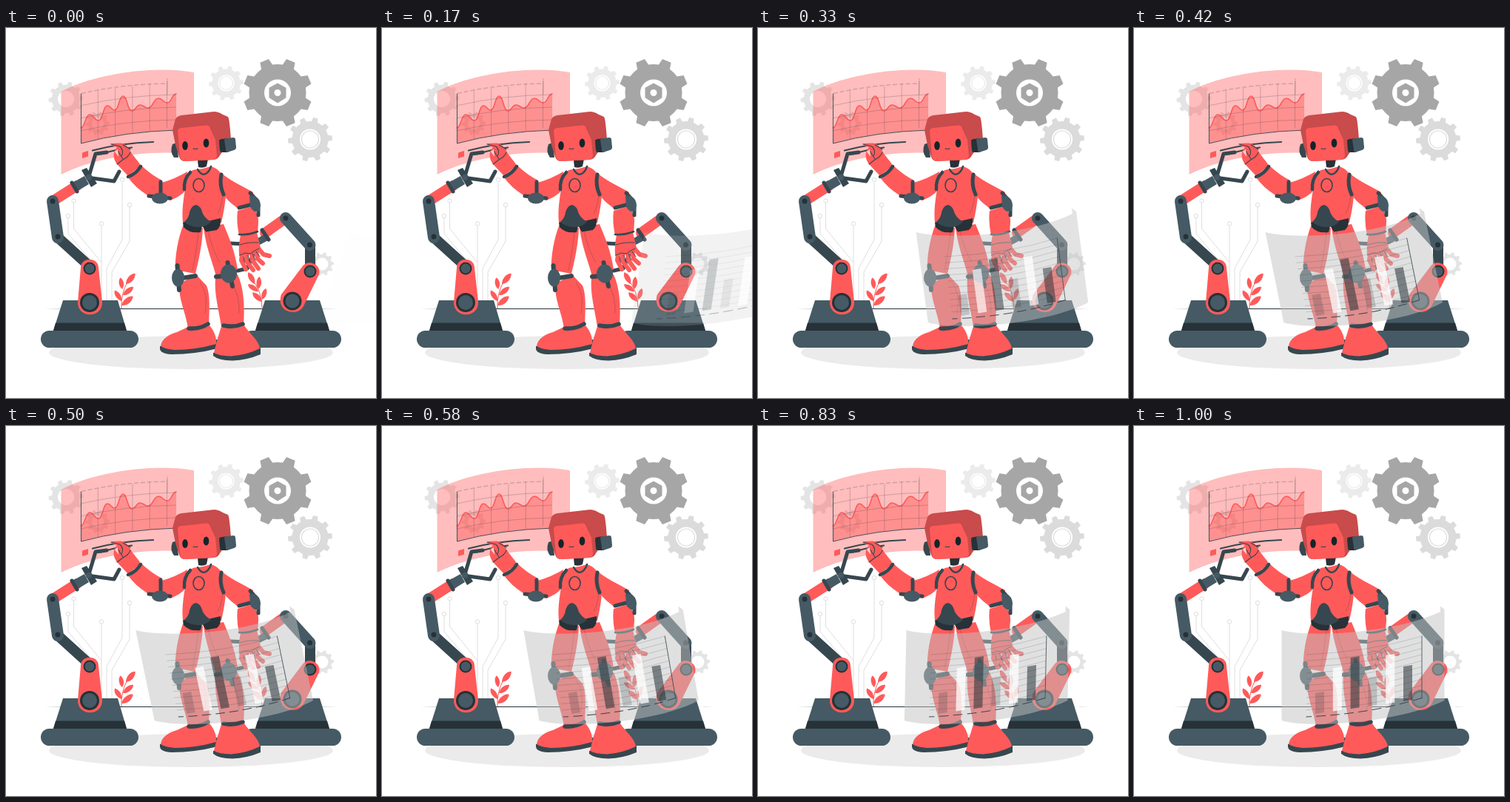
Recreate the animation shown at these times as an HTML page. Size 500x500 px, loop 1.04 s.

```html
<!DOCTYPE html>
<html lang="en">
<head>
<meta charset="utf-8">
<title>Robot and panels</title>
<style>
  html, body { margin: 0; width: 100%; height: 100%; overflow: hidden; background: #fff; }
  svg { display: block; width: 100%; height: 100%; }
  .red { fill: #ff5a5a; }
  .dark { fill: #37474f; }
  .slate { fill: #455a64; }
  .night { fill: #263238; }
  .line { fill: none; stroke: #37474f; stroke-linecap: round; stroke-linejoin: round; }
  .thin { fill: none; stroke: #263238; stroke-width: .5; }
  .limb { fill: none; stroke-linecap: round; stroke-linejoin: round; }
</style>
</head>
<body>
<svg viewBox="0 0 500 500">
  <g id="gears"></g>

  <!-- circuit traces -->
  <g fill="none" stroke="#dedede">
    <path d="M91.500 236V271L129 317M84 257V278L122 323V379M129 267V379M167 242V288L143 330V379M157 208V286L136 325V379"/>
    <g fill="#fff">
      <circle cx="91.500" cy="233.500" r="2.700"/><circle cx="84" cy="254" r="2.700"/>
      <circle cx="129" cy="264.500" r="2.700"/><circle cx="167" cy="239" r="2.700"/>
      <circle cx="157" cy="205" r="2.700"/>
    </g>
  </g>

  <ellipse cx="250" cy="438.500" rx="192" ry="22.500" fill="#ebebeb"/>
  <path class="night" d="M52 379.500L150 379H350L448 379.500L350 380H150Z"/>
  <g id="plants" class="red"></g>

  <!-- red chart panel -->
  <path d="M74.500 86C118 62 200 50 254 60V171C200 163 120 174 74.500 198Z" fill="#ff5a5a" opacity=".4"/>
  <path id="area" fill="#ff5a5a" opacity=".45"/>
  <path id="curve" class="limb" stroke="#ff5a5a" stroke-width="1.600"/>
  <path id="redGrid" class="thin" opacity=".45"/>
  <path class="line" stroke-width=".9" d="M101.500 89V156Q160 140 230 138"/>
  <path class="thin" opacity=".6" stroke-dasharray="6 3" d="M102 88.500Q155 76 218 75"/>
  <path class="red" d="M103 168.500L111 166V173.500L103 176Z"/>
  <path class="line" stroke-width="2.200" d="M117 165.500Q155 155.500 199 154M128 170.500Q148 164 170 161.500"/>

  <!-- left machine -->
  <rect class="slate" x="47" y="409" width="132" height="23" rx="11.500"/>
  <path class="slate" d="M77 368H151L163 409H64Z"/>
  <path class="night" d="M67 398.500H160L163 409H64Z"/>
  <g class="limb" stroke-width="14">
    <path stroke="#ff5a5a" d="M63 234L96 213"/>
    <path stroke="#37474f" d="M70 283L113 322"/>
    <path stroke="#455a64" stroke-width="16" d="M63 234L70 283"/>
  </g>
  <circle class="night" cx="63" cy="234" r="3.500"/><circle class="night" cx="70" cy="282" r="3.500"/>
  <path class="red" d="M101 324C101 309 125 309 125 324L130 370C131 393 96 393 97 370Z"/>
  <g class="night">
    <circle cx="113" cy="325" r="8.500"/><circle cx="113" cy="371" r="13"/>
  </g>
  <circle class="slate" cx="113" cy="325" r="6.500"/><circle class="slate" cx="113" cy="371" r="10"/>
  <path class="slate" d="M90 209L106 200L112 211L97 220Z"/>
  <path class="line" stroke-width="5" d="M89 209L96 221"/>
  <path class="dark" d="M102 192L109 189L123 210L115 215Z"/>
  <path class="line" stroke-width="5" d="M113 197L121 170L136 168M117 203L146 207L153 194"/>
  <circle class="slate" cx="112" cy="202" r="4"/>

  <!-- right machine -->
  <rect class="slate" x="321" y="409" width="132" height="23" rx="11.500"/>
  <path class="slate" d="M350 368H424L437 409H337Z"/>
  <path class="night" d="M340 398.500H434L437 409H337Z"/>
  <g class="limb" stroke-width="14">
    <path stroke="#ff5a5a" d="M378 257L350 277"/>
    <path stroke="#37474f" d="M411 293V328"/>
    <path stroke="#455a64" stroke-width="16" d="M378 257L410.500 293"/>
  </g>
  <circle class="night" cx="378" cy="257" r="3.500"/><circle class="night" cx="410.500" cy="293" r="3.500"/>
  <path class="red" d="M400 323C407 311 427 319 423 333L402 376C394 391 364 384 372 360Z"/>
  <g class="night">
    <circle cx="411" cy="329" r="8.500"/><circle cx="387" cy="369" r="12.500"/>
  </g>
  <circle class="slate" cx="411" cy="329" r="6.500"/><circle class="slate" cx="387" cy="369" r="9.500"/>
  <path class="slate" d="M352 277L337 286L341 294L356 286Z"/>
  <path class="line" stroke-width="5" d="M346 273L355 286M338 290L325 292L303 291M338 296L326 325L313 328"/>

  <!-- legs -->
  <path class="red" d="M240 265C232 285 228 310 229 327L256 332C260 315 265 295 266 270Z"/>
  <path class="red" d="M234 346C233 366 243 385 246 406L274 401C275 380 276 360 271 348Q263 340 257 333Z"/>
  <path class="red" d="M267 270C271 300 280 318 284 336L313 326C309 300 302 285 294 265Z"/>
  <path class="red" d="M283 338C281 360 288 382 291 404L321 401C323 375 321 350 313 333Z"/>
  <path class="thin" opacity=".5" d="M260 275Q257 305 252 327M262 344Q274 358 269 386M273 275Q279 300 289 317M306 347Q316 362 315 385"/>
  <path class="dark" d="M208 430L286 421L286 433Q255 441 224 441Q208 440 208 433Z"/>
  <path class="red" d="M209 430C210 420 220 414 231 411L246 404Q260 410 275 402C281 409 285 418 284 427Q256 435 228 435Q215 434 209 430Z"/>
  <path class="dark" d="M280 439L344 432L344 441Q325 449 306 449.500Q287 449 280 443Z"/>
  <path class="red" d="M281 439C284 425 288 413 291 403Q306 408 322 402C328 412 342 422 343 433Q325 442 304 443.500Q288 443 281 439Z"/>
  <path class="line" stroke-width="5.500" d="M247 406Q262 407 273 400M294 402Q308 405 320 400"/>
  <path class="line" stroke-width="6" d="M231.500 321L234 354M238 338L256 335M299.500 317L306 349M284 336L296 335"/>
  <ellipse class="slate" cx="232.500" cy="337.500" rx="8.500" ry="12"/>
  <ellipse class="slate" cx="301" cy="332" rx="11" ry="12.500"/>

  <!-- torso -->
  <path class="red" d="M259 191C249 191 246 197 244 206C241 225 237 243 239 263H291C295 245 299 225 296 208Q291 191 277 187Q268 190 259 191Z"/>
  <path class="night" d="M259 179L273 177L271 187Q266 190 260 188Z"/>
  <path class="night" d="M239 263L250 259L269 262L290 257Q291 268 285 273L270 275.500L265 267L263 276Q248 278 240 269Z"/>
  <path class="dark" d="M241 262Q247 257 248 249Q251 239 257 239Q263 240 266 251Q269 257 277 262Q269 270 258 269Q247 268 241 262Z"/>
  <path class="line" stroke-width="2.500" d="M259 191Q264 200 270 197Q275 194 277 187"/>
  <ellipse class="line" stroke-width="1.600" cx="260.500" cy="212.500" rx="7.500" ry="9"/>
  <path class="thin" opacity=".5" d="M293 226Q291 242 286 251"/>

  <!-- raised arm -->
  <path class="red" d="M245 194C235 200 222 206 210 209L207 228L222 233C232 229 239 224 243 219Z"/>
  <path class="red" d="M183 186Q197 199 211 206L208 227L191 226Q174 215 165 202Z"/>
  <path class="red" d="M165 200L182 186C178 178 170 172 167 164Q163 157 155 155.500L143 156Q139 158 150 161C144 168 144 176 150 184Z"/>
  <path class="line" stroke-width="1.100" d="M142 157L154 160Q160 166 156 173M151 166L158 177M158 158L168 164M150 184L158 178Q166 174 168 168"/>
  <path d="M151 164L147 167L152 174Z" fill="#ffd0d0"/>
  <path class="line" stroke-width="4.500" d="M165 201Q176 197 182 187M249 195Q240 204 241 218"/>
  <path class="line" stroke-width="5" d="M209 208L209 222M193 227L222 230"/>
  <ellipse class="slate" cx="208" cy="230" rx="11" ry="7.500"/>

  <!-- lowered arm -->
  <path class="red" d="M290 195C300 205 320 214 334 222L331 242L315 245C305 238 296 230 292 222Z"/>
  <path class="red" d="M313 247L333 241Q342 253 341 263L340 277L315 280Q311 262 313 247Z"/>
  <path class="red" d="M317 280L339 276L344 297L335 306L315 308Q314 293 317 280Z"/>
  <g class="limb" stroke="#ff5a5a" stroke-width="6">
    <path d="M319 305L318 314L324 326M325 305V315L334 327M332 304L333 314L341 325M338 302L340 312L347 318M341 298L348 306L356 308"/>
  </g>
  <path class="line" stroke-width="1" d="M316 307L323 304L330 305L336 301L342 298M322 316L321 309M329 316L327 307M337 314L333 305M343 309L338 302M316 293Q327 289 341 290"/>
  <path class="line" stroke-width="2.500" d="M315 279Q328 280 340 275"/>
  <path class="line" stroke-width="5" d="M291 198Q288 212 294 225M315 243L330 239M330 223L338 232M341 245V253"/>
  <path class="slate" d="M329 227Q336 225 342 232Q346 240 342 248Q334 250 330 241Z"/>

  <!-- head -->
  <path class="dark" d="M225 157L231 155L233 175L227 175Q221 167 225 157Z"/>
  <path d="M225 138L229 123Q231 119 237 118L281 113Q287 113 293 117L300 120Q302 122 304 151L289 172Q287 177 281 178L242 180Q236 180 234 174L229 158Z" fill="#c94b4b"/>
  <path class="red" d="M232 139Q232 135 238 135L270 131.500Q275 131 276 136L283 151L285 173Q284 177 280 178L242 180Q236 180 235 173Z"/>
  <g fill="#16242a">
    <ellipse cx="242" cy="159" rx="3.800" ry="6"/><ellipse cx="270.500" cy="155.500" rx="3.800" ry="6"/>
  </g>
  <path class="line" stroke-width="1.200" d="M253 163Q256 164 259 163"/>
  <path class="night" d="M288 153Q288 150 292 150L300 149V168L292 168Q289 168 289 165Z"/>
  <path class="slate" d="M295 151Q296 149 299 149L307 148Q310 148 310 151L311 161Q311 164 308 165L299 168Q297 168 297 164Z"/>

  <!-- grey panel that flies in -->
  <g id="panel" opacity="0">
    <path d="M199.500 276C235 286 350 281 414 251V243.500L419.500 248V371C355 402 235 409 199.500 398Z" fill="#c2c2c2" opacity=".5"/>
    <path id="greyGrid" class="thin" opacity=".35"/>
    <g id="bars"></g>
    <path class="line" stroke-width=".8" d="M389 284V367.500"/>
    <path class="line" stroke-width="1" stroke-dasharray="12 7" d="M389 367.500Q320 389 233 393"/>
  </g>
</svg>
<script>
const $ = id => document.getElementById(id);
const svgNS = 'http://www.w3.org/2000/svg';

function add(parent, tag, attrs) {
  const el = document.createElementNS(svgNS, tag);
  for (const key in attrs) el.setAttribute(key, attrs[key]);
  parent.append(el);
}

function gear(x, y, outer, teeth, fill, hole, turn = -.064) {
  const root = outer * .82, step = 2 * Math.PI / teeth;
  const pts = [];
  for (let i = 0; i < teeth; i++) {
    for (const [offset, r] of [[-.27, root], [-.17, outer], [.17, outer], [.27, root], [.5, root]]) {
      const a = (i + offset) * step + turn;
      pts.push(`${x + r * Math.cos(a)},${y + r * Math.sin(a)}`);
    }
  }
  const g = $('gears');
  add(g, 'polygon', { points: pts.join(' '), fill });
  add(g, 'circle', { cx: x, cy: y, r: hole, fill: '#fff' });
  return g;
}

function ring(x, y, r, stroke) {
  add($('gears'), 'circle', { cx: x, cy: y, r, fill: 'none', stroke, 'stroke-width': 1.2 });
}

gear(297.5, 74.5, 23.5, 10, '#ebebeb', 11);
ring(297.5, 74.5, 9, '#ebebeb');
gear(411, 150.5, 30, 10, '#dbdbdb', 14);
ring(411, 150.5, 11.5, '#dbdbdb');
gear(81, 96, 23.5, 10, '#e4e4e4', 11);
gear(124, 129, 16, 10, '#dbdbdb', 8);
gear(427, 319, 16, 10, '#e4e4e4', 8.5);
const nut = gear(367, 87.5, 47, 8, '#a6a6a6', 18, Math.PI / 8);
add(nut, 'path', { d: 'M367 75L378 81V94L367 101L356 94V81Z', fill: '#a6a6a6', stroke: '#a6a6a6', 'stroke-linejoin': 'round' });
add(nut, 'circle', { cx: 367, cy: 87.5, r: 4.5, fill: '#fff' });

// each leaf: base x, base y, length, angle in degrees
function plant(stem, leaves) {
  add($('plants'), 'path', { d: stem, fill: 'none', stroke: '#ff5a5a' });
  for (const [x, y, len, angle] of leaves) {
    const w = len * .26;
    add($('plants'), 'path', {
      d: `M0 0C${len * .3} ${-w} ${len * .8} ${-w} ${len} 0C${len * .7} ${w} ${len * .3} ${w} 0 0Z`,
      transform: `translate(${x} ${y}) rotate(${angle})`
    });
  }
}
plant('M156 379Q155 360 164 343',
  [[162, 346, 19, -48], [157, 353, 16, -98], [158, 361, 18, -38], [156, 369, 17, -122], [156, 375, 20, -38]]);
plant('M346 378Q346 355 331 338',
  [[336, 346, 18, -118], [341, 353, 17, -85], [341, 356, 17, -145], [346, 367, 16, -70], [346, 370, 18, -135]]);

// smooth wave through a few heights
const wave = [101, 135, 113, 117, 125, 125, 137, 105, 147, 111, 158, 92, 170, 112, 181, 104, 192, 108, 206, 95, 218, 101, 230, 89];
let wavePath = `M${wave[0]} ${wave[1]}`;
for (let i = 2; i < wave.length; i += 2) {
  const mid = (wave[i - 2] + wave[i]) / 2;
  wavePath += `C${mid} ${wave[i - 1]} ${mid} ${wave[i + 1]} ${wave[i]} ${wave[i + 1]}`;
}
$('curve').setAttribute('d', wavePath);
$('area').setAttribute('d', wavePath + 'V138Q160 140 101 156Z');

let grid = '';
for (let i = 1; i < 4; i++) {
  const y = 88 + i * 17;
  grid += `M101 ${y}Q160 ${y - 14} 230 ${y - 15}`;
}
for (let i = 1; i < 6; i++) {
  const x = 101 + i * 23.3;
  grid += `M${x} ${87 - i * 3}V${155 - i * 4}`;
}
$('redGrid').setAttribute('d', grid + 'M218 68V90');

grid = '';
for (let i = 0; i < 10; i++) {
  const y = 284 + i * 8.3;
  grid += `M389 ${y}Q320 ${y + 21} 233 ${y + 25}`;
}
$('greyGrid').setAttribute('d', grid);

// bars repeat pale, white, dark
const barStyles = [
  { fill: '#263238', opacity: .2 },
  { fill: '#fff', opacity: .75 },
  { fill: '#263238', opacity: .55 }
];
[361, 327, 313, 340, 310, 325].forEach((top, i) => {
  const x = 245 + i * 23.8, foot = 389 - i * 3.4;
  add($('bars'), 'path', { d: `M${x} ${top}L${x + 12} ${top - 2}V${foot - 2}L${x} ${foot}Z`, ...barStyles[i % 3] });
});

const LOOP = 1040, LEAD = 33, CENTER_Y = 323;
const tan = deg => Math.tan(deg * Math.PI / 180);
const mix = (a, b, p) => a + (b - a) * p;

function bezier(a, b, t) {
  const u = 1 - t;
  return 3 * u * u * t * a + 3 * u * t * t * b + t * t * t;
}

// overshooting ease, solved by bisection
function ease(x) {
  let lo = 0, hi = 1;
  for (let i = 0; i < 24; i++) {
    const mid = (lo + hi) / 2;
    if (bezier(.36, .5, mid) < x) lo = mid; else hi = mid;
  }
  return bezier(-.01, 1.38, lo);
}

// time, horizontal shift, skew in degrees, opacity
const keys = [[0, 250, -20, 0], [600, 0, 10, 1], [800, 0, -2, 1], [1000, 0, 0, 1]];

function draw(now) {
  const time = Math.min(now % LOOP + LEAD, 1000);
  const next = keys.findIndex((key, i) => i && time <= key[0]);
  const a = keys[next - 1], b = keys[next];
  const p = ease((time - a[0]) / (b[0] - a[0]));
  const shift = mix(a[1], b[1], p), skew = mix(tan(a[2]), tan(b[2]), p);
  $('panel').setAttribute('transform', `matrix(1 0 ${skew} 1 ${shift - skew * CENTER_Y} 0)`);
  $('panel').setAttribute('opacity', Math.max(0, Math.min(1, mix(a[3], b[3], p))));
}

const start = performance.now();
function tick() {
  draw(performance.now() - start);
  requestAnimationFrame(tick);
}
tick();
</script>
</body>
</html>
```
